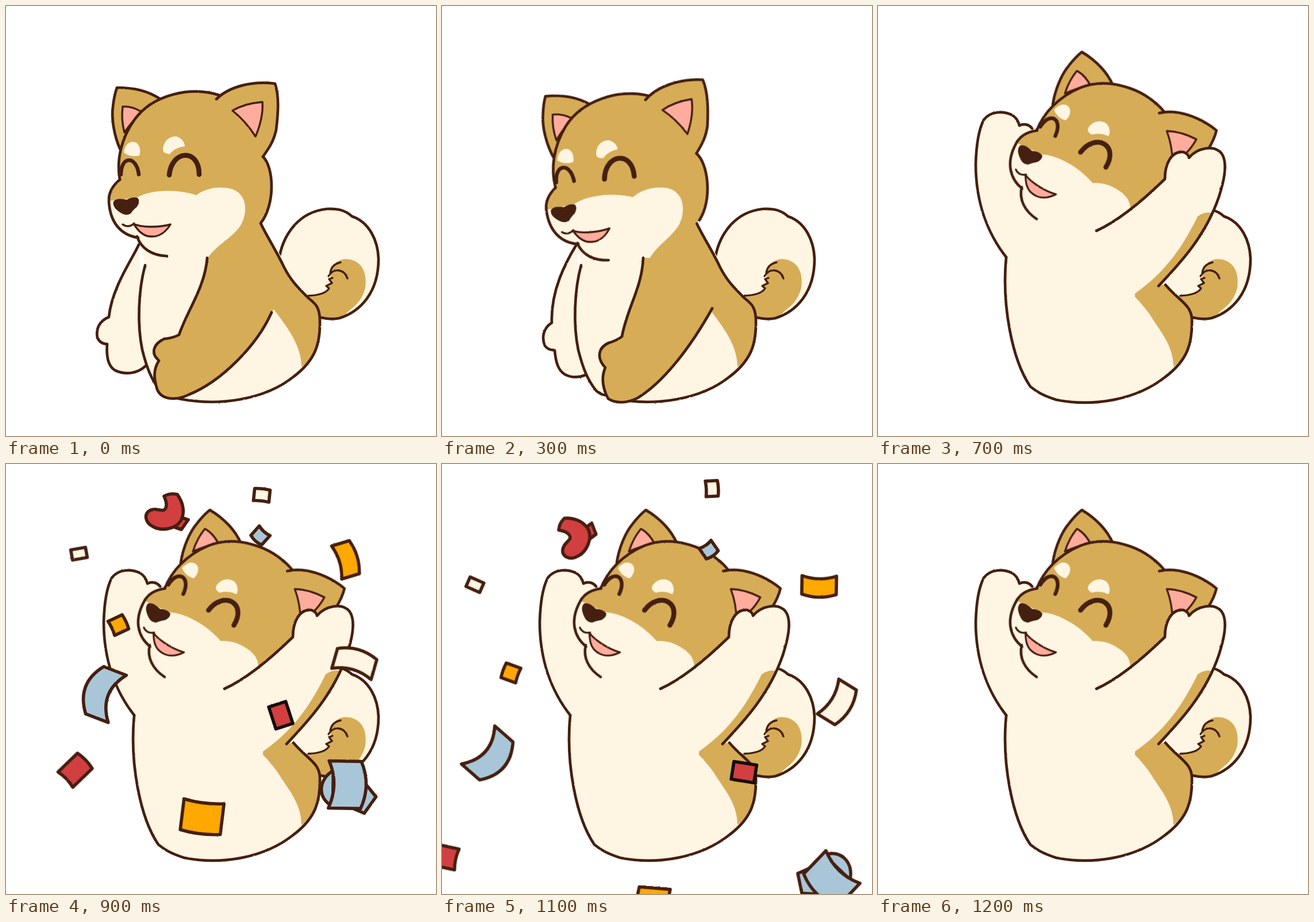
Animation of 748 by 748 pixels, one loop 1.6 s. Source, as an HTML page:

```html
<!DOCTYPE html>
<html lang="en">
<head>
<meta charset="utf-8">
<title>Cheering dog</title>
<style>
  html, body { margin: 0; width: 100%; height: 100%; overflow: hidden; background: #fff; }
  svg { display: block; width: 100vw; height: 100vh; }
  path { fill: none; stroke-linecap: round; stroke-linejoin: round; }
  .tan { fill: #d6ac57; }
  .cream { fill: #fef5e2; }
  .pink { fill: #ffac9d; }
  .dark { fill: #451f10; }
  .line { stroke: #451f10; stroke-width: 4.7; }
  .thin { stroke-width: 3.4; }
  .bold { stroke-width: 8.6; }
  .sit1, .sit2, .sit, .up1, .up2, .up, #head, #confetti g {
    animation: 1600ms step-end infinite;
  }
  .sit1 { animation-name: sit1; }
  .sit2 { animation-name: sit2; }
  .sit { animation-name: sit; }
  .up1 { animation-name: up1; }
  .up2 { animation-name: up2; }
  .up { animation-name: up; }
  #head { animation-name: nod; }
  #confetti g { animation-name: fly; }
  #confetti path { stroke-width: 5.6; }

  @keyframes sit1 { 0% { visibility: visible } 18.75%, 100% { visibility: hidden } }
  @keyframes sit2 { 0% { visibility: hidden } 18.75% { visibility: visible } 37.5%, 100% { visibility: hidden } }
  @keyframes sit { 0% { visibility: visible } 37.5%, 100% { visibility: hidden } }
  @keyframes up1 { 0% { visibility: hidden } 37.5% { visibility: visible } 43.75%, 100% { visibility: hidden } }
  @keyframes up2 { 0% { visibility: hidden } 43.75%, 100% { visibility: visible } }
  @keyframes up { 0% { visibility: hidden } 37.5%, 100% { visibility: visible } }

  /* the head is rigid and turns about the nose */
  @keyframes nod {
    0% { transform: translate(209px, 347px) rotate(0deg) }
    18.75% { transform: translate(212px, 360px) rotate(-4.5deg) }
    37.5% { transform: translate(242.5px, 279px) rotate(23deg) scale(.99) }
    43.75%, 100% { transform: translate(262px, 260px) rotate(31.7deg) scale(.985) }
  }

  #confetti g {
    --s: 0;
    visibility: hidden;
    transform: translate(calc(var(--x) + var(--s) * var(--dx)), calc(var(--y) + var(--s) * var(--dy)))
      rotate(calc(var(--r) + var(--s) * var(--dr)));
  }
  @keyframes fly {
    0% { visibility: hidden; --s: -1 }
    50% { visibility: visible; --s: -1 }
    56.25% { visibility: visible; --s: 0 }
    62.5% { visibility: visible; --s: 1 }
    68.75% { visibility: visible; --s: 2.25 }
    75%, 100% { visibility: hidden; --s: 2.25 }
  }
</style>
</head>
<body>
<svg viewBox="0 0 748 748">
  <filter id="rough" x="0" y="0" width="748" height="748" filterUnits="userSpaceOnUse" color-interpolation-filters="sRGB">
    <feTurbulence type="fractalNoise" baseFrequency=".3" numOctaves="1" seed="4"/>
    <feDisplacementMap in="SourceGraphic" scale="2" xChannelSelector="R" yChannelSelector="G"/>
  </filter>
  <g filter="url(#rough)">
    <!-- tail -->
    <path class="cream" d="M476 434C484 396 510 358 558 353C579 352 591 356 600 364C632 376 647 408 648 440C648 488 622 528 575 544L545 542L490 500Z"/>
    <path class="tan" d="M523 505C545 505 560 498 562 490L558 486L566 482L564 475L566 457C575 440 590 437 605 443C622 450 628 468 625 490C620 510 610 520 598 529Q585 542 575 544L547 542L530 520Z"/>
    <path class="line" d="M476 434C484 396 510 358 558 353C579 352 591 356 602 366C632 376 647 408 648 440C648 500 615 532 580 543Q566 546 548 542"/>
    <path class="line thin" d="M526 504C548 503 558 498 562 491L557 487L567 482L562 475L568 473M561 470C570 455 588 457 594 474M564 465Q566 449 582 446"/>

    <!-- seated: far arm and body -->
    <path class="cream line sit1" d="M231 415C220 440 184 490 179 541C162 548 156 562 159 577C163 586 170 588 176 588C174 612 178 627 190 634C208 642 228 640 243 626"/>
    <path class="cream line sit2" d="M234 415C215 446 189 495 191 551C176 560 173 577 179 591C184 598 190 598 196 599C198 620 202 634 214 641C227 648 240 646 252 641"/>
    <g class="sit">
      <path class="cream" d="M234 405L242 450C230 495 228 555 237 598C245 630 255 655 276 678L300 683C370 698 450 685 500 645C540 615 547 585 546 545L443 378Z"/>
      <path class="tan" d="M350 440L400 370L443 378C456 405 470 425 484 455C500 485 525 508 540 520C548 538 548 560 543 585Q534 614 514 628C514 592 492 562 466 528L400 590L345 490Z"/>
      <path class="line" d="M242 451C230 495 228 555 237 598C245 630 253 650 268 669Q276 676 284 677M300 683C370 697 450 685 500 645C540 615 547 585 546 545C545 525 540 519 526 508C510 492 497 480 484 455C470 425 456 405 443 378"/>
    </g>

    <!-- cheering: far arm and chest -->
    <path class="cream up" d="M222 437L240 290L400 300L500 484C515 505 541 515 545 540C549 575 538 612 500 643C450 685 375 698 310 685C285 677 275 670 265 662C235 615 215 520 222 437Z"/>
    <g class="up1">
      <path class="cream" d="M223 435C170 398 120 310 118 240C118 210 132 194 158 198C170 201 174 207 179 211C190 200 202 209 206 220C209 230 205 242 208 247L220 266L300 300L300 440Z"/>
      <path class="line" d="M223 435C170 398 120 310 118 240C118 210 132 194 158 198C170 201 174 207 179 211C190 200 202 209 206 220C209 230 205 242 208 247L220 266"/>
    </g>
    <g class="up2">
      <path class="cream" d="M223 437C190 395 170 340 170 275C171 240 175 215 184 198C196 182 218 183 232 189C240 193 244 200 246 208C254 204 263 206 268 213L300 300L300 440Z"/>
      <path class="line" d="M223 437C190 395 170 340 170 275C171 240 175 215 184 198C196 182 218 183 232 189C240 193 244 200 246 208C254 204 263 206 268 213"/>
    </g>

    <!-- head -->
    <g id="head"><g transform="translate(-209 -347)">
      <path class="tan line" d="M198 248C188 225 183 195 186 175Q188 156 193 142C222 142 247 147 270 163"/>
      <path class="pink line thin" d="M206 220C202 205 201 190 203 175Q219 174 236 184Q220 200 206 220Z"/>
      <path class="tan" d="M197 302C192 270 199 232 224 197C255 155 320 138 374 156L447 262C466 280 469 340 443 378L352 437L320 380L200 370L179 340C179 320 188 310 197 302Z"/>
      <path class="cream" d="M181 339L228 333C255 318 300 319 331 329C350 315 375 313 395 319C416 328 420 350 413 371C404 399 371 410 352 437L280 435C254 434 236 422 230 403C202 399 182 378 181 339Z"/>
      <path class="line" d="M198 302C192 270 199 232 224 197C255 155 320 138 374 156"/>
      <path class="tan line" d="M366 162C388 140 428 130 468 135C476 158 473 190 470 215C466 235 457 248 447 262"/>
      <path class="line" d="M447 262C466 280 469 345 443 378M198 302C186 312 178 324 179 340C181 379 202 399 230 403M228 401C235 422 254 434 280 435"/>
      <path class="pink line thin" d="M394 182Q416 169 446 167Q448 194 434 227Q417 200 394 182Z"/>
      <path class="cream" d="M205 255C207 240 216 234 225 237C233 241 235 252 232 260Q217 264 205 255ZM273 250C274 233 286 226 297 227C308 231 311 239 311 244Q294 246 285 257Q274 258 273 250Z"/>
      <path class="line" style="stroke-width:6.5" d="M200 293C200 260 227 260 231 293"/>
      <path class="line bold" d="M284 294C288 250 336 247 336 293"/>
      <path class="dark" d="M187 340C193 333 203 336 210 337Q221 331 229 334C233 338 231 344 228 349Q220 356 217 361Q208 366 200 360C190 354 185 347 187 340Z"/>
      <path class="pink line thin" d="M222 379C236 385 263 386 286 380C274 400 258 403 245 400C233 396 228 387 222 379Z"/>
      <path class="line thin" d="M203 380Q213 387 223 378"/>
    </g></g>

    <!-- seated: near arm -->
    <path class="tan sit1" d="M350 438C346 490 315 530 301 572Q289 578 275 579C258 587 250 603 266 617C256 632 257 648 263 667C272 688 300 685 318 676C375 653 437 590 462 533L410 440Z"/>
    <path class="line sit1" d="M350 438C346 490 315 530 301 572Q289 578 275 579C258 587 250 603 266 617C256 632 257 648 263 667C272 688 300 685 318 676C375 653 437 590 462 533"/>
    <path class="tan sit2" d="M350 438C348 490 322 525 313 575Q304 582 290 586C272 594 268 612 284 629C276 648 281 668 289 683C303 692 322 691 340 682C383 656 430 598 470 526L410 440Z"/>
    <path class="line sit2" d="M350 438C348 490 322 525 313 575Q304 582 290 586C272 594 268 612 284 629C276 648 281 668 289 683C303 692 322 691 340 682C383 656 430 598 470 526"/>

    <!-- cheering: near arm and flank -->
    <path class="cream up1" d="M380 391C415 383 445 367 471 350C468 325 482 301 505 301L521 305C545 290 575 306 580 338C583 358 579 375 570 390C550 427 516 452 488 487L450 500L340 480L325 402Z"/>
    <path class="cream up2" d="M380 391C420 373 462 337 499 301C499 275 510 252 531 254L541 262C555 247 585 240 598 257C610 275 600 310 593 332C570 400 525 448 488 487L450 500L340 480L325 402Z"/>
    <path class="tan up1" d="M541 424L528 425C510 453 480 475 447 500L490 490Z"/>
    <path class="tan up2" d="M580 360Q568 357 556 366C532 415 502 462 447 500L490 490C530 440 562 410 580 360Z"/>
    <path class="tan up" d="M447 500L490 487L500 484C515 505 541 515 545 540C549 575 538 610 514 628C514 590 490 565 473 537Q461 520 447 506Z"/>
    <path class="line up" d="M223 437C215 520 233 615 265 662C275 670 285 677 310 685C375 698 450 685 500 645C540 615 547 585 546 545C545 520 525 514 500 485"/>
    <path class="line up1" d="M380 391C415 383 445 367 471 350C468 325 482 301 505 301Q512 304 513 312Q518 305 526 303C549 291 575 306 580 338C583 358 579 375 570 390C550 427 516 452 488 487"/>
    <path class="line up2" d="M380 391C420 373 462 337 499 301C499 275 510 252 531 254Q540 257 541 264C555 247 585 240 598 257C610 275 600 310 593 332C570 400 525 448 488 487"/>

    <g id="confetti"></g>
  </g>
</svg>
<script>
  const colors = { w: '#fef5e2', b: '#a9c6d9', o: '#ffa800', r: '#d23f40' };
  const box = document.getElementById('confetti');

  // a paper strip, its long edges bowed by bend
  const strip = (w, h, bend) => {
    const x = w / 2, y = h / 2, b = bend / 2;
    return `M${-x} ${b - y}Q0 ${-y - bend - b} ${x} ${b - y}L${x} ${y + b}Q0 ${y - bend - b} ${-x} ${y + b}Z`;
  };

  const roll = ['M-24 25C-10 50 24 54 38 25Z', 'M-6 -28L20 -50L49 -30L40 -8Z', strip(82, 56, 9)];
  const curl = [
    'M19 8L37 14L25 31L8 25Z',
    'M-5 -27Q6 -33 18 -30C28 -16 32 1 24 16C14 31 -10 34 -24 26C-40 18 -39 3 -30 -2C-20 -8 -11 0 -5 -3Q3 -9 -5 -27Z'
  ];

  // start x, y, angle, then x, y, angle one step later
  function add(color, paths, x, y, r, x2, y2, r2, ink) {
    const g = document.createElementNS(box.namespaceURI, 'g');
    const vars = {
      x: x + 'px', y: y + 'px', r: r + 'deg',
      dx: x2 - x + 'px', dy: y2 - y + 'px', dr: r2 - r + 'deg'
    };
    for (const k in vars) g.style.setProperty('--' + k, vars[k]);
    for (const d of paths) {
      const p = document.createElementNS(box.namespaceURI, 'path');
      p.setAttribute('d', d);
      p.setAttribute('class', 'line');
      p.style.fill = colors[color];
      if (ink) p.style.stroke = ink;
      g.append(p);
    }
    box.append(g);
  }

  add('w', [strip(27, 21, 1)], 445, 54, 6, 456, 49, 42);
  add('r', curl, 280, 83, 0, 257, 102, -25);
  add('b', [strip(25, 22, -2)], 442, 125, 42, 452, 136, 8);
  add('w', [strip(26, 18, 0)], 127, 156, -10, 96, 180, -75);
  add('o', [strip(60, 32, 5)], 593, 166, 73, 621, 187, 121);
  add('o', [strip(27, 27, 1)], 196, 280, 65, 162, 317, 5);
  add('w', [strip(71, 36, 8)], 607, 344, 16, 644, 376, 63);
  add('b', [strip(88, 42, -17)], 166, 398, 111, 130, 447, 40);
  add('r', [strip(31, 40, 0)], 478, 437, -18, 499, 481, 34, '#140d0c');
  add('r', [strip(37, 47, 2)], 121, 532, 46, 68, 599, -9);
  add('b', roll, 594, 558, 91, 630, 632, 150);
  add('o', [strip(70, 54, -3)], 341, 615, 7, 352, 685, 46);
</script>
</body>
</html>
```
